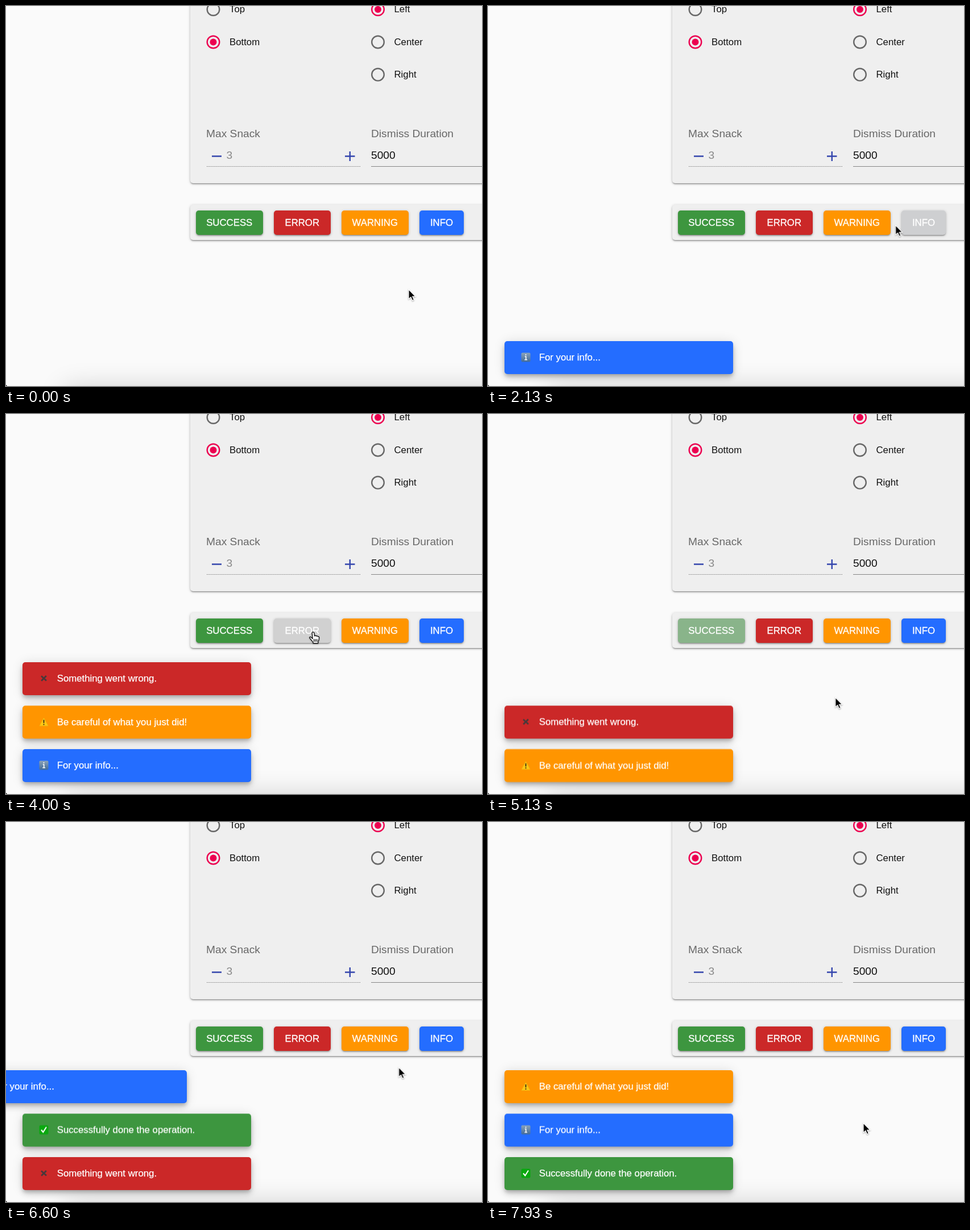
Write an HTML page that moves like this. It is 837 px wide and 669 px high and loops after 8000 ms.

```html
<!DOCTYPE html>
<html lang="en">
<head>
<meta charset="utf-8">
<title>Snackbar demo</title>
<style>
html, body { margin: 0; width: 100%; height: 100%; overflow: hidden; background: #fafafa; }
body { font: 16.8px/20px "Liberation Sans", Arial, sans-serif; color: #111; }
#stage { position: absolute; left: 0; top: 0; width: 837px; height: 669px; overflow: hidden; background: #fafafa; }
#stage div, #stage svg { position: absolute; }
svg { overflow: visible; }
.card { left: 324px; width: 560px; background: #efefef; border-radius: 5px; }
.card, .button { box-shadow: 0 1px 5px rgba(0,0,0,.22), 0 2px 2px rgba(0,0,0,.18), 0 3px 1px -2px rgba(0,0,0,.14); }
.label { white-space: pre; }
.field { font-size: 19.2px; }
.button { top: 360px; height: 43px; border-radius: 5px; overflow: hidden; color: #fff; text-align: center; line-height: 43px; -webkit-text-stroke: .3px #fff; }
.button span { position: relative; }
.ripple { border-radius: 50%; background: #fff; opacity: 0; }
.snack { left: 28.5px; top: 590px; width: 402px; height: 57.5px; border-radius: 5px; color: #fff; -webkit-text-stroke: .25px #fff;
  box-shadow: 0 4px 6px -1px rgba(0,0,0,.2), 0 7px 12px rgba(0,0,0,.14), 0 1px 20px rgba(0,0,0,.12); }
.snack span { position: absolute; left: 61.2px; line-height: 58px; white-space: pre; }
.snack svg { left: 29px; top: 20px; width: 17px; height: 17px; }
#glow { left: 104px; top: 674px; width: 900px; height: 60px; box-shadow: 0 0 48px rgba(0,0,0,.2); }
#corner { left: 0; top: 667px; border-left: 2px solid #000; border-top: 2px solid transparent; }
#pointer { left: 0; top: 0; width: 0; height: 0; }
#pointer svg { left: 0; top: 0; width: 20px; height: 22px; filter: drop-shadow(0 1.2px 1px rgba(0,0,0,.35)); }
</style>
</head>
<body>
<div id="stage">
  <div class="card" style="top:-40px;height:352px"></div>
  <div class="card" style="top:350px;height:62px"></div>
  <svg id="controls" width="837" height="669">
    <g fill="none" stroke-width="2.4">
      <path d="M362 264.5H379M596 264.5H613.5M604.8 256V273" stroke="#3446ad"/>
      <path d="M353 282.5H623" stroke="#777" stroke-width="1.2" stroke-dasharray="1.2 1.2"/>
      <path d="M642 282.5H837" stroke="#858585" stroke-width="1.2"/>
    </g>
  </svg>
  <div id="glow"></div>
  <div id="corner"></div>
  <div id="snacks"></div>
  <div id="pointer">
    <svg id="arrow"><path d="M0 0V17L3.9 13.4L6.6 19.6L9.4 18.4L6.8 12.4H12Z" fill="#000" stroke="#fff" stroke-width="1.2"/></svg>
    <svg id="hand"><g fill="#fff" stroke="#000" stroke-width="1.2" stroke-linejoin="round" stroke-linecap="round">
      <path d="M-1.8 1.4C-1.8-.6 1.5-.6 1.8 1.4L2.5 7C3 5.4 5.2 5.6 5.4 7.2C6.2 6 8 6.4 8.2 8C9.2 7.2 10.6 7.8 10.6 9.4C10.8 13 10 14.6 8.8 16.8V19.6H0V17.6C-1.8 15.6-4 13-6 10.4C-7 8.8-4.8 7.6-3.4 9.2L-.8 11.6Z"/>
      <path d="M1.6 12.5V16.5M4.2 12.5V16.5M6.8 12.5V16.5" fill="none"/>
    </g></svg>
  </div>
</div>
<script>
const LOOP = 8000;
const STANDARD = 'cubic-bezier(.4,0,.2,1)', DECELERATE = 'cubic-bezier(0,0,.2,1)', SHARP = 'cubic-bezier(.4,0,.6,1)';
const HOVER_GRAY = '#d0d0d0';
const COLORS = { success: '#3d963f', error: '#cb2828', warning: '#ff9500', info: '#246dff' };
const stage = document.getElementById('stage');
const sheet = document.head.appendChild(document.createElement('style'));
let trackCount = 0;

// Each frame is [ms, declarations, easing until the next frame].
function track(el, frames) {
  const name = 'track' + trackCount++;
  const all = [[0, frames[0][1]], ...frames.filter(f => f[0] > 0), [LOOP, frames[frames.length - 1][1]]];
  const body = all.map(([t, css, ease = 'linear']) => `${t / LOOP * 100}%{${css};animation-timing-function:${ease}}`);
  sheet.append(`@keyframes ${name}{${body.join('')}}\n`);
  (el.tracks ||= []).push(`${name} ${LOOP}ms linear infinite`);
}

function box(parent, className, style, html = '') {
  const el = document.createElement('div');
  el.className = className;
  el.style.cssText = style;
  el.innerHTML = html;
  parent.append(el);
  return el;
}

function label(text, x, middle, color = '#111', extra = '') {
  box(stage, 'label ' + extra, `left:${x}px;top:${middle - 10}px;color:${color}`, text);
}

function radio(text, x, y, checked) {
  const color = checked ? '#ec0050' : '#686868';
  document.getElementById('controls').insertAdjacentHTML('beforeend',
    `<circle cx="${x}" cy="${y}" r="10.8" fill="none" stroke="${color}" stroke-width="2.4"/>` +
    (checked ? `<circle cx="${x}" cy="${y}" r="6" fill="${color}"/>` : ''));
  label(text, x + 28.5, y);
}

radio('Top', 364.5, 6);
radio('Bottom', 364.5, 63.5, true);
radio('Left', 654, 6, true);
radio('Center', 654, 63.5);
radio('Right', 654, 120.8);
label('Max Snack', 352, 225, '#686868', 'field');
label('Dismiss Duration', 642, 225, '#686868', 'field');
label('3', 387.5, 262.5, '#888', 'field');
label('5000', 642, 262.5, '#111', 'field');

// hovers: [enter, leave]; clicks: [release time, pointer x, pointer y]
const buttons = [
  { kind: 'success', x: 333.5, w: 118.5, hovers: [[4320, 5045]], clicks: [[4565, 410, 384]] },
  { kind: 'error', x: 471, w: 99.5, hovers: [[3165, 4285]], clicks: [[3650, 540, 384]] },
  { kind: 'warning', x: 589.5, w: 118.5, hovers: [[2155, 3110], [6720, 7185]], clicks: [[2680, 650, 384], [7125, 655, 390]] },
  { kind: 'info', x: 727, w: 78, hovers: [[860, 2112], [5580, 6098]], clicks: [[1640, 762, 382], [5925, 765, 384]] }
];

function addRipple(button, w, [release, px, py]) {
  const press = release - 95;
  const size = Math.hypot(2 * Math.max(px, w - px) + 2, 2 * Math.max(py, 43 - py) + 2);
  const el = box(button, 'ripple', `left:${px - size / 2}px;top:${py - size / 2}px;width:${size}px;height:${size}px`);
  track(el, [[press, 'transform:scale(0)', STANDARD], [press + 550, 'transform:scale(1)']]);
  track(el, [[press - 1, 'opacity:0', 'step-end'], [press, 'opacity:.3'],
    [release, 'opacity:.3', STANDARD], [release + 550, 'opacity:0']]);
}

for (const { kind, x, w, hovers, clicks } of buttons) {
  const el = box(stage, 'button', `left:${x}px;width:${w}px;background:${COLORS[kind]}`);
  const base = `background-color:${COLORS[kind]}`, gray = `background-color:${HOVER_GRAY}`;
  track(el, hovers.flatMap(([enter, leave]) => [
    [enter, base, STANDARD], [enter + 250, gray], [leave, gray, STANDARD], [leave + 250, base]]));
  for (const [t, px, py] of clicks) addRipple(el, w, [t, px - x, py - 360]);
  el.insertAdjacentHTML('beforeend', `<span>${kind.toUpperCase()}</span>`);
}

const messages = {
  success: 'Successfully done the operation.',
  error: 'Something went wrong.',
  warning: 'Be careful of what you just did!',
  info: 'For your info...'
};
const icons = {
  success: '<rect x=".5" y=".5" width="16" height="16" rx="2.5" fill="#09a80f"/><path d="M4 8.5L7.3 12.5L13 3.5" fill="none" stroke="#fff" stroke-width="2"/>',
  error: '<path d="M4 4.2L13 12.5M12.8 4L4.2 12.8" stroke="#48393a" stroke-width="2.8"/>',
  warning: '<path d="M8.5 1.5L16 15.5H1Z" fill="#ffc814" stroke="#f2b311" stroke-linejoin="round"/><path d="M8.5 5V10.5M8.5 12V14" stroke="#302a18" stroke-width="1.8"/>',
  info: '<defs><linearGradient id="steel" x2="0" y2="1"><stop stop-color="#8ba3b9"/><stop offset="1" stop-color="#426b99"/></linearGradient></defs><rect x=".5" y=".5" width="16" height="16" rx="2" fill="url(#steel)"/><path d="M8.5 3V5M6.8 7H8.7V12.5M6.3 12.7H11" fill="none" stroke="#fff" stroke-width="1.6"/>'
};
const SLOT = 76.5, EXIT = 195, DROP_DELAY = 150, DROP = 200, QUEUE_DELAY = 390;
const dismissals = [4565, 5925, 7125];
const queued = dismissals.map(t => t + EXIT + QUEUE_DELAY);

function addSnack(kind, enter, level, exit) {
  const el = box(document.getElementById('snacks'), 'snack', `background:${COLORS[kind]}`,
    `<svg viewBox="0 0 17 17">${icons[kind]}</svg><span>${messages[kind]}</span>`);
  const away = 'translate:-470px 0', home = 'translate:0 0';
  const slide = [[enter, away, DECELERATE], [enter + 225, home]];
  if (exit) slide.push([exit, home, SHARP], [exit + EXIT, away]);
  track(el, slide);

  const at = n => `transform:translateY(${-n * SLOT}px)`;
  const drops = [[enter, at(level)]];
  for (const t of dismissals) {
    const start = t + EXIT + DROP_DELAY;
    if (start < enter || (exit && t >= exit)) continue;
    drops.push([start, at(level), 'ease'], [start + DROP, at(--level)]);
  }
  track(el, drops);
}

addSnack('info', 1640, 0, dismissals[0]);
addSnack('warning', 2680, 1, dismissals[1]);
addSnack('error', 3650, 2, dismissals[2]);
addSnack('success', queued[0], 2);
addSnack('info', queued[1], 2);
addSnack('warning', queued[2], 2);

const pointer = document.getElementById('pointer');
const path = [
  [100, 708, 499, 'ease-in-out'], [1250, 762, 382], [1750, 762, 382, 'ease-in'],
  [2130, 717, 386, 'ease-out'], [2420, 650, 384], [2850, 650, 384, 'ease-in-out'],
  [3300, 540, 384], [4080, 540, 384, 'ease-in-out'], [4480, 410, 384],
  [4900, 410, 384, 'ease-in'], [5050, 425, 403], [5130, 610, 499, 'ease-out'],
  [5300, 690, 505, 'ease-in-out'], [5680, 765, 384], [6030, 765, 384, 'ease-in'],
  [6130, 771, 448, 'ease-out'], [6300, 740, 490, 'ease-in-out'], [6850, 655, 390],
  [7150, 655, 390, 'ease-in-out'], [7330, 668, 536, 'ease-out'], [7930, 660, 530]
];
track(pointer, path.map(([t, x, y, ease]) => [t, `transform:translate(${x}px,${y}px)`, ease]));

const spans = buttons.flatMap(b => b.hovers).sort((a, b) => a[0] - b[0]);
function showPointer(id, onButton, offButton) {
  track(document.getElementById(id), [[0, `opacity:${offButton}`],
    ...spans.flatMap(([enter, leave]) => [
      [enter - 1, `opacity:${offButton}`, 'step-end'], [enter, `opacity:${onButton}`, 'step-end'],
      [leave, `opacity:${offButton}`, 'step-end']])]);
}
showPointer('arrow', 0, 1);
showPointer('hand', 1, 0);
stage.append(pointer);

for (const el of stage.querySelectorAll('*')) {
  if (el.tracks) el.style.animation = el.tracks.join(',');
}
</script>
</body>
</html>
```
